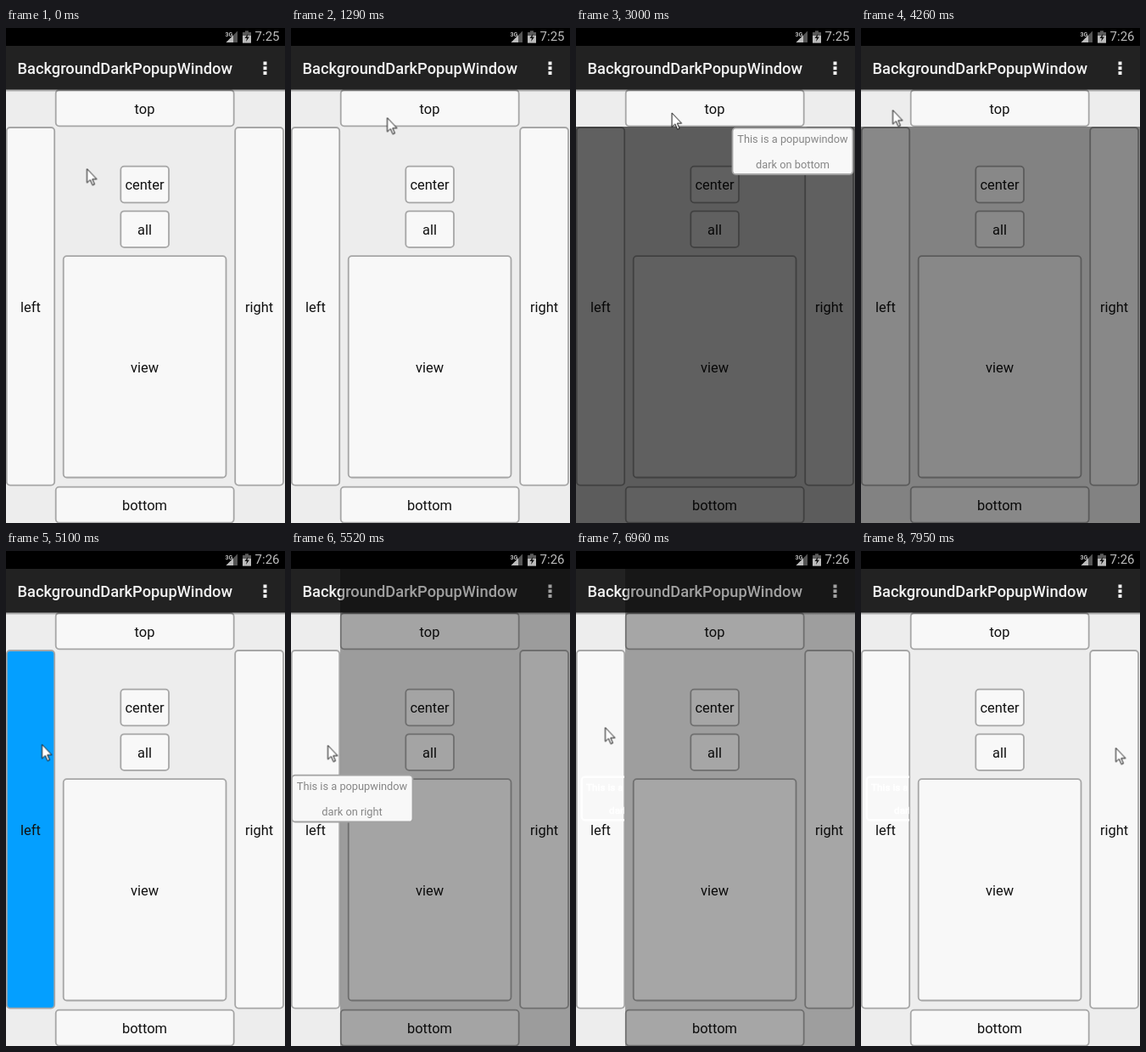
These frames come from a looping animation (329 px wide and 582 px high, 8000 ms). An HTML page:

```html
<!DOCTYPE html>
<html lang="en">
<head>
<meta charset="utf-8">
<title>BackgroundDarkPopupWindow</title>
<style>
html, body { margin: 0; width: 100%; height: 100%; overflow: hidden; background: #ededed; }
svg { display: block; width: 100%; height: 100%; font-family: Roboto, sans-serif; }
text { text-anchor: middle; }

.button rect { fill: #f8f8f8; stroke: #a6a6a6; stroke-width: 1.8; }
.button text { fill: #111; font-size: 16.45px; }
.popup rect { fill: #f8f8f8; stroke: #a2a2a2; stroke-width: 1.8; }
.popup text, .ghost text { font-size: 12.8px; }
.popup text { fill: #868686; }
.ghost rect { fill: none; stroke: #fff; stroke-width: 2.4; }
.ghost text { fill: #fff; stroke: #fff; stroke-width: .7; }
.title { fill: #f3f3f3; font-size: 18.28px; font-weight: 500; text-anchor: start; }
.clock { fill: #bcbcbc; font-size: 15px; text-anchor: end; }

.anim { animation: 8s linear infinite; }
.hard { animation-timing-function: step-end; }
.popup { transform-box: fill-box; transform-origin: center; }

#top rect { animation-name: press-top; }
#left rect { animation-name: press-left; }
#right rect { animation-name: press-right; }
#early { animation-name: early; }
#late { animation-name: late; }
#dim-below { animation-name: dim-below; animation-timing-function: cubic-bezier(.37, 0, .63, 1); }
#dim-right { animation-name: dim-right; animation-timing-function: cubic-bezier(.37, 0, .63, 1); }
#popup-below { animation-name: popup-below; }
#popup-right { animation-name: popup-right; }
#ghost { animation-name: ghost; }
#cursor { animation-name: cursor; }

@keyframes press-top { 0%, 26.25% { fill: #f8f8f8; } 24.375% { fill: #049fff; } }
@keyframes press-left { 0%, 65.25% { fill: #f8f8f8; } 63.75% { fill: #049fff; } }
@keyframes press-right { 0%, 99.375% { fill: #f8f8f8; } 97.125% { fill: #049fff; } }
@keyframes early { 0% { opacity: 1; } 46.125%, 100% { opacity: 0; } }
@keyframes late { 0% { opacity: 0; } 46.125%, 100% { opacity: 1; } }
@keyframes ghost { 0% { opacity: 0; } 86.5%, 100% { opacity: 1; } }

@keyframes dim-below {
  0%, 27.6% { opacity: 0; }
  31.35%, 52% { opacity: .61; }
  55.75%, 100% { opacity: 0; }
}
@keyframes dim-right {
  0%, 67% { opacity: 0; }
  70.75%, 85.25% { opacity: .61; }
  89%, 100% { opacity: 0; }
}
@keyframes popup-below {
  0%, 26.875% { opacity: 0; transform: scale(.9); }
  28.75%, 51.875% { opacity: 1; transform: none; }
  53.06%, 100% { opacity: 0; transform: scale(.9); }
}
@keyframes popup-right {
  0%, 66.375% { opacity: 0; transform: scale(.9); }
  68.5%, 85.25% { opacity: 1; transform: none; }
  86.625%, 100% { opacity: 0; transform: scale(.9); }
}
@keyframes cursor {
  0%, 7.6% { transform: translate(95.5px, 165.5px); animation-timing-function: ease-in-out; }
  16.125%, 18.2% { transform: translate(113.5px, 105.5px); }
  18.75%, 33.5% { transform: translate(118.5px, 101.5px); animation-timing-function: ease-in-out; }
  35.625% { transform: translate(130px, 100.5px); animation-timing-function: ease-in-out; }
  42%, 53.4% { transform: translate(37.5px, 96.5px); animation-timing-function: ease-in-out; }
  60.375%, 65.25% { transform: translate(42.5px, 227.5px); }
  67.5%, 73.9% { transform: translate(43.5px, 228.5px); animation-timing-function: ease-in-out; }
  79.5%, 87.2% { transform: translate(34.5px, 207.5px); animation-timing-function: ease-in-out; }
  93%, 100% { transform: translate(300.5px, 231.5px); }
}
</style>
</head>
<body>
<svg viewBox="0 0 329 582">
  <defs>
    <linearGradient id="shade" x2="0" y2="1">
      <stop offset="0" stop-color="#000" stop-opacity=".4"/>
      <stop offset="1" stop-color="#000" stop-opacity="0"/>
    </linearGradient>
    <clipPath id="left-strip"><rect width="57" height="582"/></clipPath>
  </defs>

  <rect width="329" height="582" fill="#ededed"/>

  <g class="button" id="top"><rect class="anim hard" x="58.7" y="73" width="210" height="42.3" rx="4"/><text x="163.5" y="101">top</text></g>
  <g class="button" id="left"><rect class="anim hard" x=".8" y="117" width="56.4" height="420.6" rx="4"/><text x="29" y="333.5">left</text></g>
  <g class="button" id="right"><rect class="anim hard" x="270.2" y="117" width="56.8" height="420.6" rx="4"/><text x="298.5" y="333.5">right</text></g>
  <g class="button"><rect x="135.3" y="162.7" width="56.7" height="42.6" rx="4"/><text x="163.5" y="190">center</text></g>
  <g class="button"><rect x="135.3" y="215.3" width="56.7" height="42.6" rx="4"/><text x="163.5" y="243">all</text></g>
  <g class="button"><rect x="67.7" y="268.2" width="191.8" height="260.3" rx="4"/><text x="163.5" y="405">view</text></g>
  <g class="button"><rect x="58.7" y="539.6" width="210" height="42" rx="4"/><text x="163.5" y="567">bottom</text></g>

  <rect y="21" width="329" height="51.5" fill="#222"/>
  <rect y="72.5" width="329" height="3" fill="url(#shade)"/>
  <text class="title" x="13.5" y="54">BackgroundDarkPopupWindow</text>
  <path d="M303.5 39.5h4v4h-4zm0 5.7h4v4h-4zm0 5.7h4v4h-4z" fill="#f3f3f3"/>

  <rect class="anim" id="dim-below" y="116" width="329" height="466"/>
  <rect class="anim" id="dim-right" x="58" y="21" width="271" height="561"/>

  <rect width="329" height="21"/>
  <path d="M273 3.5V17H259.5Z" fill="#555"/>
  <path d="M268 8.5V17H259.5Z" fill="#bcbcbc"/>
  <text x="263" y="9.5" font-size="7" font-weight="700" fill="#bcbcbc">3G</text>
  <path d="M279 5h3V3.3h4V5h3v12.5h-10z" fill="#5a5a5a"/>
  <path d="M279 9h10v8.5h-10z" fill="#bcbcbc"/>
  <path d="M285.5 6.5l-4 5.5h2.5l-1 4 4-5.5h-2.5z" fill="#111"/>
  <text class="clock anim hard" id="early" x="322.5" y="15.3">7:25</text>
  <text class="clock anim hard" id="late" x="322.5" y="15.3">7:26</text>

  <g class="ghost anim hard" id="ghost" clip-path="url(#left-strip)">
    <g transform="translate(72 291) scale(.92) translate(-72 -291)">
      <rect x="1" y="263.5" width="142" height="55" rx="4"/>
      <text x="72" y="281">This is a popupwindow</text>
      <text x="72" y="311">dark on right</text>
    </g>
  </g>

  <g class="popup anim" id="popup-below">
    <rect x="184.5" y="117.6" width="142" height="54.4" rx="4"/>
    <text x="255.5" y="135">This is a popupwindow</text>
    <text x="255.5" y="165">dark on bottom</text>
  </g>
  <g class="popup anim" id="popup-right">
    <rect x="1" y="263.6" width="142.5" height="54.9" rx="4"/>
    <text x="72" y="281">This is a popupwindow</text>
    <text x="72" y="311">dark on right</text>
  </g>

  <path class="anim" id="cursor" d="M0 0V16.5L3.8 13 6.6 19.3 9 18.2 6.3 12.2H11.5Z" fill="#fff" stroke="#111"/>
</svg>
</body>
</html>
```
